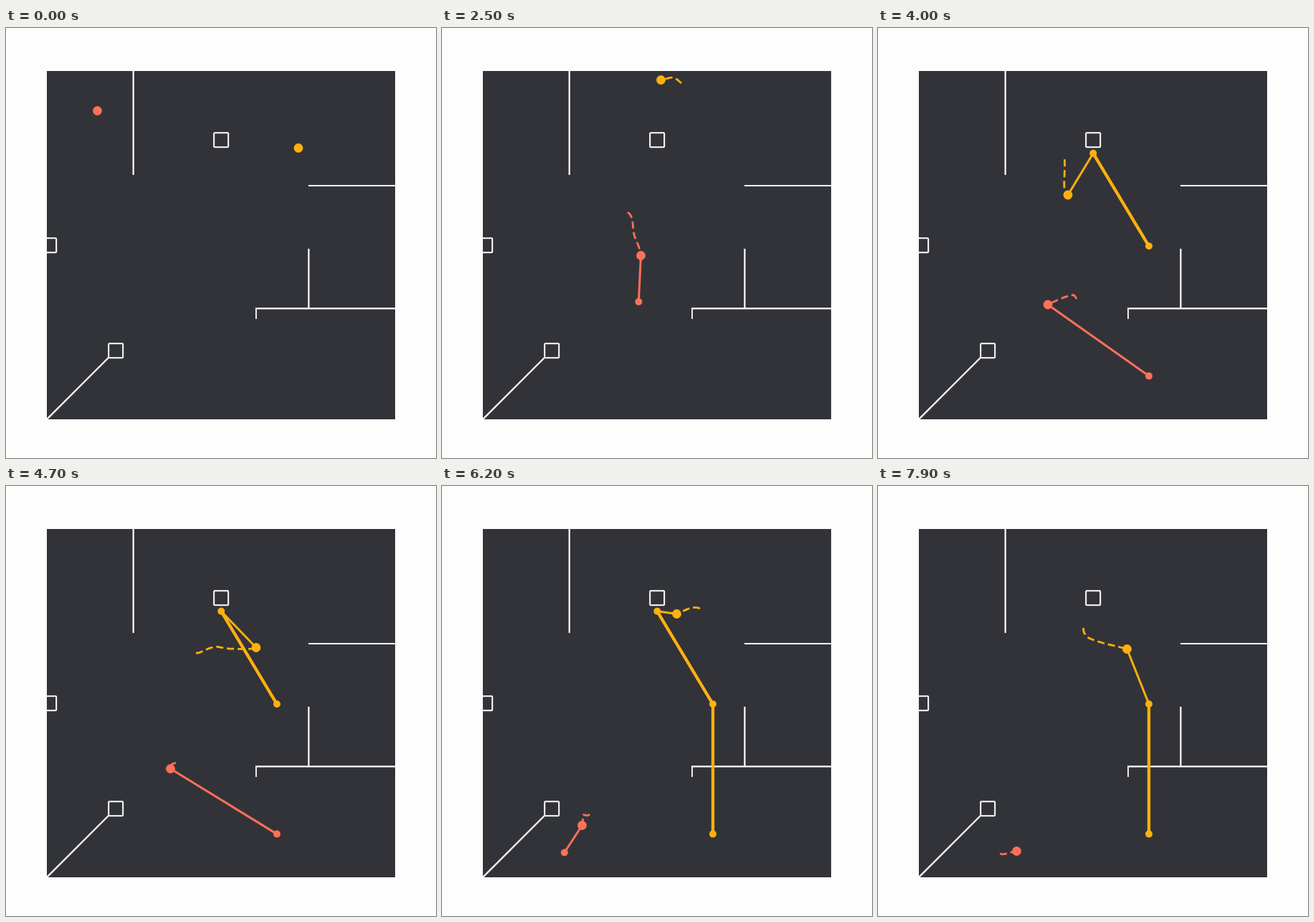
Animation, 600 px wide and 600 px high, one loop 8000 ms. Source, as an HTML page with a canvas:

```html
<!DOCTYPE html>
<html lang="en">
<head>
<meta charset="utf-8">
<title>Two agents</title>
<style>
html, body { margin: 0; width: 100%; height: 100%; overflow: hidden; background: #fdfdfd; }
canvas { display: block; }
</style>
</head>
<body>
<canvas width="600" height="600"></canvas>
<script>
const ctx = document.querySelector('canvas').getContext('2d');
const STEP = 100, STEPS = 80, TRAIL = 7, CELL = 25.9;

// path: key poses [step, x, y]; stops: [shown from, shown until, column, row]
const agents = [
  {
    color: '#ffb010',
    path: [
      [0, 408, 167.5], [5, 381, 209], [7, 376, 190], [9, 380, 169], [12, 375.5, 137.5],
      [18, 334, 77], [25, 305.5, 72.5], [27, 267.5, 90], [34, 260.5, 195.5], [40, 265, 233],
      [42, 290, 224.5], [44, 311, 227], [47, 349, 225.5], [51, 378, 203], [55, 360, 171],
      [62, 327.5, 178.5], [72, 287, 198], [74, 294, 212], [79, 347.5, 227.5]
    ],
    stops: [[4, 19, 1, -9], [40, 68, 0, -5], [40, 80, 3, 0], [51, 80, 3, 7]]
  },
  {
    color: '#ff7058',
    path: [
      [0, 127.5, 115.5], [5, 172, 211], [8, 183, 226], [12, 196.5, 243.5], [18, 259, 257],
      [22, 268.5, 290], [25, 277.5, 317.5], [27, 273, 346], [32, 279, 382], [34, 272.5, 372.5],
      [40, 237, 386], [47, 229.5, 394.5], [55, 206, 458], [57, 197, 459], [62, 195.5, 473.5],
      [72, 171, 512], [79, 193.5, 509.5]
    ],
    stops: [[5, 17, -2, -2], [19, 32, -1, 3], [32, 40, -3, 3], [32, 51, 3, 7], [56, 71, -5, 8]]
  }
];

const cell = (col, row) => [300.3 + col * CELL, 304.3 + row * CELL];

// Smooth curve through the key poses
function place(path, step) {
  const at = i => path[Math.max(0, Math.min(path.length - 1, i))];
  const i = Math.max(1, path.findIndex(p => p[0] >= step));
  const a = at(i - 1), b = at(i), span = b[0] - a[0], k = (step - a[0]) / span;
  const slope = (j, axis) => (at(j + 1)[axis] - at(j - 1)[axis]) / (at(j + 1)[0] - at(j - 1)[0]);
  return [1, 2].map(axis =>
    a[axis] + (b[axis] - a[axis]) * k * k * (3 - 2 * k)
    + span * k * (1 - k) * ((1 - k) * slope(i - 1, axis) - k * slope(i, axis)));
}

function line(points, width, color = '#fff', dash = []) {
  ctx.strokeStyle = color;
  ctx.lineWidth = width;
  ctx.setLineDash(dash);
  ctx.beginPath();
  points.forEach(p => ctx.lineTo(...p));
  ctx.stroke();
}

function dot([x, y], r, color) {
  ctx.fillStyle = color;
  ctx.beginPath();
  ctx.arc(x, y, r, 0, 7);
  ctx.fill();
}

function box(x, y) {
  ctx.setLineDash([]);
  ctx.strokeStyle = '#fff';
  ctx.lineWidth = 2;
  ctx.beginPath();
  ctx.roundRect(x - 10, y - 10, 20, 20, 1);
  ctx.stroke();
}

function drawArena() {
  ctx.fillStyle = '#fdfdfd';
  ctx.fillRect(0, 0, 600, 600);
  ctx.save();
  ctx.beginPath();
  ctx.rect(57, 60, 486, 486);
  ctx.clip();
  ctx.fillStyle = '#323338';
  ctx.fillRect(57, 60, 486, 486);
  line([[177.7, 60], [177.7, 205]], 2.2);
  line([[422, 220], [543, 220]], 2);
  line([[422.4, 308], [422.4, 391]], 2.2);
  line([[348, 391.4], [543, 391.4]], 2.2);
  line([[349, 391], [349, 406]], 1.8);
  line([[57, 546], [143, 460]], 2.3);
  box(300.2, 156.3);
  box(60.2, 303.2);
  box(153.2, 450.2);
  ctx.restore();
}

function drawAgent({ color, path, stops }, step) {
  const pos = place(path, step);
  const trail = [];
  for (let s = Math.max(0, step - TRAIL); s <= step; s += 0.5) trail.push(place(path, s));
  line(trail, 2.8, color, [10, 5]);

  const plan = stops
    .filter(([from, until]) => step >= from && step < until)
    .map(([, , col, row]) => cell(col, row));
  if (plan.length) line([pos, plan[0]], 3, color);
  line(plan, 4.3, color);
  plan.forEach(p => dot(p, 5, color));
  dot(pos, 6.4, color);
}

function frame(now) {
  const step = Math.floor(now / STEP) % STEPS;
  drawArena();
  agents.forEach(agent => drawAgent(agent, step));
  requestAnimationFrame(frame);
}
requestAnimationFrame(frame);
</script>
</body>
</html>
```
